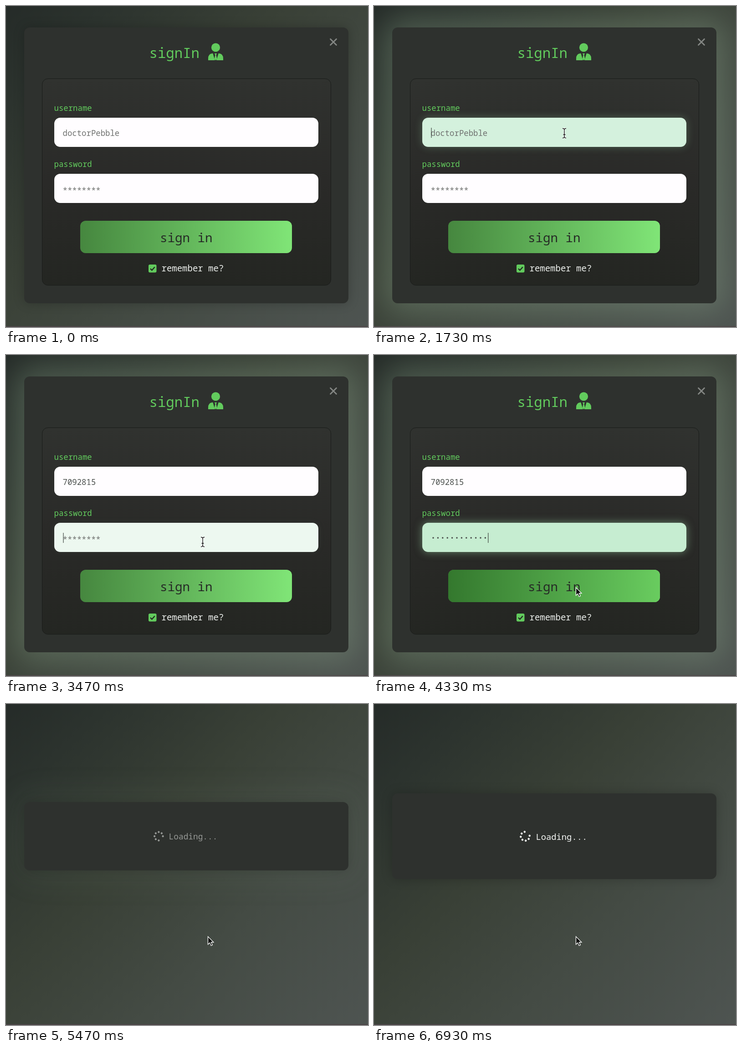
An HTML page that plays this animation: 795x704 px, repeating every 7 s.

```html
<!DOCTYPE html>
<html lang="en">
<head>
<meta charset="utf-8">
<title>Sign in</title>
<style>
html, body { margin: 0; width: 100%; height: 100%; overflow: hidden; }
body {
  position: relative;
  background: linear-gradient(135deg, #252b28, #2c332e 15%, #394036 40%, #444b44 66%, #4e5451);
}
div, svg { position: absolute; box-sizing: border-box; }
svg { left: 0; top: 0; }
#edge { left: 0; top: 702px; width: 100%; height: 2px; background: #4b4446; }
#card { left: 40px; width: 712px; border-radius: 12px; background: #2e312e; }
#panel {
  left: 79px; top: 159px; width: 635px; height: 454px; border-radius: 13px;
  border: 1.5px solid #191b19;
  background: linear-gradient(#30322f, #2a2a28 50%, #242622);
}
.field { left: 106px; width: 580px; height: 64px; border-radius: 13px; }
#user { top: 245px; }
#pass { top: 368px; }
.button { left: 163px; top: 471px; width: 465px; height: 71px; border-radius: 12px; }
#idle { background: linear-gradient(90deg, #46873f, #80e577); }
#hover { background: linear-gradient(90deg, #34782e, #69cc5f); }
text { font: 17.33px "Noto Sans Mono", monospace; white-space: pre; }
.green { fill: #62cb5d; }
.label { font-weight: 500; }
.hint { fill: #707270; }
.typed { fill: #4b504d; }
</style>
</head>
<body>
<div id="edge"></div>
<div id="card"></div>
<div id="form">
  <div id="panel"></div>
  <div id="user" class="field"></div>
  <div id="pass" class="field"></div>
  <div id="idle" class="button"></div>
  <div id="hover" class="button"></div>
</div>
<svg width="795" height="704" viewBox="0 0 795 704">
  <g id="labels">
    <text class="green" x="314.5" y="114" style="font-size:30.7px">signIn</text>
    <g class="green">
      <circle cx="460.5" cy="91" r="9.6"/>
      <path d="M444 119v-4q0-10 9-11h15q9 1 9 11v4z"/>
      <path d="M454 103l5 16.5h3l5-16.5z" fill="#2e312e"/>
      <path d="M458 104h5l-1.5 3.5 2 9-3 2.5-3-2.5 2-9z"/>
    </g>
    <path d="M712.5 72.5l13 13m0-13l-13 13" stroke="#858885" stroke-width="2.8" stroke-linecap="round"/>
    <text class="green label" x="105.5" y="230">username</text>
    <text class="green label" x="105.5" y="353">password</text>
    <text id="userText" x="124.5" y="285"></text>
    <text id="passHint" class="hint" x="124.5" y="410.5">********</text>
    <path id="dots" stroke="#4b504d" stroke-width="3.6" stroke-linecap="round" stroke-dasharray="0 10.4"/>
    <path id="caret" stroke="#3c423e" stroke-width="1.2"/>
    <text x="338" y="517.5" fill="#262a26" style="font-size:27.5px">sign in</text>
    <rect class="green" x="313" y="567" width="17.5" height="17.5" rx="3"/>
    <path d="M317 576l3.4 3.5 6.3-7" fill="none" stroke="#222822" stroke-width="2.5"/>
    <text x="341.5" y="582" fill="#eef1ee" style="font-size:19px">remember me?</text>
  </g>
  <g id="loader" fill="#f6f8f6">
    <g id="spinner"></g>
    <text x="355.5" y="297.5" style="font-size:18.8px">Loading...</text>
  </g>
  <path id="arrow" d="M0 0V17.2L4 13.6 6.8 20 9.8 18.7 7.1 12.5H12.4Z" fill="#0a0c0a" stroke="#fff" stroke-width="1.3"/>
  <g id="beam" fill="none">
    <path stroke="#fff" stroke-width="3.2"/>
    <path stroke="#111" stroke-width="1.4"/>
  </g>
</svg>
<script>
const LOOP = 7000, SWAP = 5330, CHAR = 10.4;
const NAME = "7092815", HINT = "doctorPebble";
const FOCUS_USER = 1580, FOCUS_PASS = 3400;
const USER_KEYS = { start: 1970, step: 140, count: NAME.length };
const PASS_KEYS = { start: 3560, step: 42, count: 12 };

// Pointer path: time, x, y
const POINTER = [
  [470, 790, 700], [700, 610.5, 531], [900, 610.5, 531], [1420, 418, 279],
  [3060, 418, 279], [3320, 432, 410], [4040, 432, 410], [4290, 443.5, 510]
];

const $ = id => document.getElementById(id);
const clamp = v => Math.min(1, Math.max(0, v));
const lerp = (a, b, k) => a + (b - a) * k;
const smooth = k => k * k * (3 - 2 * k);
const easeOut = k => 1 - (1 - k) ** 2;
const ramp = (t, from, ms) => clamp((t - from) / ms);
const show = (el, on) => { el.style.display = on ? "" : "none"; };

for (let i = 0; i < 7; i++) {
  const a = (i + 1) * Math.PI / 4;
  $("spinner").innerHTML +=
    `<circle cx="${9.75 * Math.cos(a)}" cy="${9.75 * Math.sin(a)}" r="2.25"/>`;
}
for (const p of $("beam").children)
  p.setAttribute("d", "M-4-10.5q4 0 4 3v15q0 3-4 3M4-10.5q-4 0-4 3v15q0 3 4 3M-2.5 3h5");

function pointerAt(t) {
  let i = POINTER.length - 1;
  while (i > 0 && POINTER[i][0] > t) i--;
  const a = POINTER[i], b = POINTER[i + 1] || a;
  const k = a === b ? 0 : smooth(ramp(t, a[0], b[0] - a[0]));
  return [lerp(a[1], b[1], k), lerp(a[2], b[2], k)];
}

function keysTyped(t, keys) {
  if (t < keys.start) return 0;
  return Math.min(keys.count, 1 + Math.floor((t - keys.start) / keys.step));
}

function paintField(el, k) {
  const mix = (a, b) => Math.round(lerp(a, b, k));
  el.style.background = `rgb(${mix(255, 198)},${mix(253, 237)},${mix(255, 209)})`;
  el.style.boxShadow = `0 0 18px rgba(160,220,170,${0.5 * k * k})`;
}

function paintCaret(t, focus, keys, y) {
  const n = keysTyped(t, keys);
  const last = n ? keys.start + (n - 1) * keys.step : focus;
  show($("caret"), t >= focus && Math.floor((t - last) / 500) % 2 === 0);
  $("caret").setAttribute("d", `M${126 + n * CHAR} ${y - 11}v22`);
}

function paintForm(t) {
  const typed = keysTyped(t, USER_KEYS), dots = keysTyped(t, PASS_KEYS);
  $("userText").textContent = typed ? NAME.slice(0, typed) : HINT;
  $("userText").setAttribute("class", typed ? "typed" : "hint");
  show($("passHint"), !dots);
  show($("dots"), dots);
  $("dots").setAttribute("d", `M130 401h${(dots - 1) * CHAR + 0.1}`);

  paintField($("user"), t < FOCUS_PASS ? easeOut(ramp(t, FOCUS_USER, 300)) : 0);
  paintField($("pass"), easeOut(ramp(t, FOCUS_PASS, 400)));
  if (t < FOCUS_PASS) paintCaret(t, FOCUS_USER, USER_KEYS, 278);
  else paintCaret(t, FOCUS_PASS, PASS_KEYS, 401);

  $("hover").style.opacity =
    ramp(t, 590, 120) - ramp(t, 1010, 200) + ramp(t, 4170, 140);
}

function paintPointer(t) {
  const [x, y] = pointerAt(t);
  const typing = (t > USER_KEYS.start && t < 3060) || (t > PASS_KEYS.start && t < 4040);
  const visible = t >= 470 && !typing;
  const inField = t < SWAP && x > 106 && x < 686 &&
    ((y > 245 && y < 309) || (y > 368 && y < 432));
  for (const id of ["arrow", "beam"]) {
    show($(id), visible && inField === (id === "beam"));
    $(id).setAttribute("transform", `translate(${x} ${y})`);
  }
}

function paintCard(t, loading) {
  const k = ramp(t, SWAP, 270);
  const h = loading ? lerp(108, 188, k) : 605;
  const glow = smooth(ramp(t, 470, 240)) * (1 - easeOut(k));
  const card = $("card").style;
  card.top = (loading ? 290 - h / 2 : 47) + "px";
  card.height = h + "px";
  card.boxShadow = `0 0 24px rgba(0,0,0,${0.22 * (1 - glow)}),` +
    `0 0 70px 20px rgba(150,178,150,${0.34 * glow})`;

  const s = lerp(0.89, 1, k);
  $("loader").style.opacity = k;
  $("loader").setAttribute("transform", `translate(395.5 290) scale(${s}) translate(-395.5 -290)`);
  // One slot in the ring stays empty; a turn takes two seconds.
  const turn = 45 + (t - 5470) * 0.18;
  $("spinner").setAttribute("transform", `translate(332 290) rotate(${turn})`);
}

function render(t) {
  const loading = t >= SWAP;
  show($("form"), !loading);
  show($("labels"), !loading);
  show($("loader"), loading);
  paintCard(t, loading);
  if (!loading) paintForm(t);
  paintPointer(t);
}

let begin;
function tick(now) {
  begin ??= now;
  render((now - begin) % LOOP);
  requestAnimationFrame(tick);
}
render(0);
requestAnimationFrame(tick);
</script>
</body>
</html>
```
